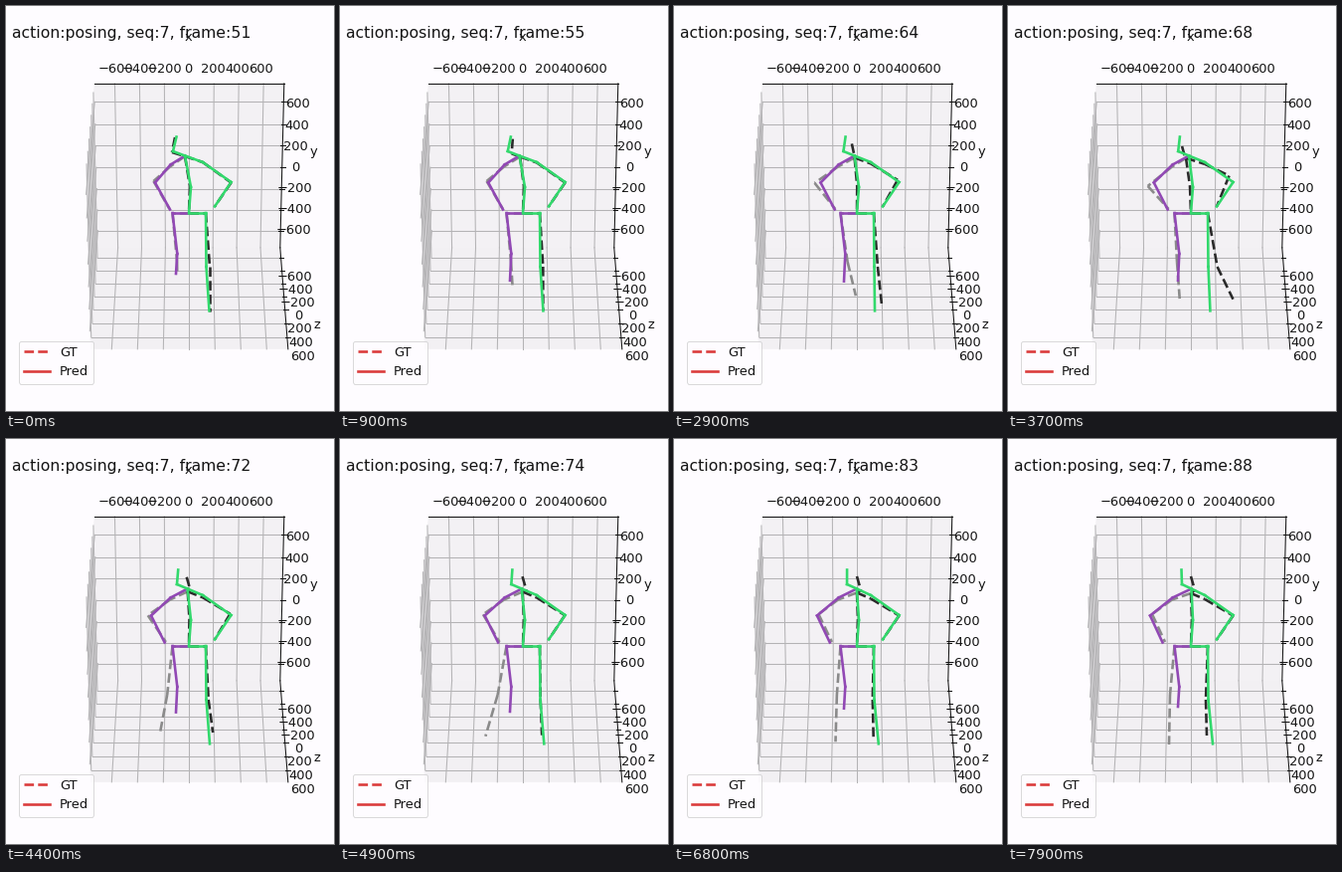
Animation, 330 px wide and 407 px high, one loop 8 s. Source, as a matplotlib script:

```python
import numpy as np
import matplotlib.pyplot as plt
from matplotlib.animation import FuncAnimation
from matplotlib.patches import Polygon

W, H, DPI = 330, 407, 64
PX = 72 / DPI  # points per pixel
FRAMES, INTERVAL = 80, 100
FIRST, LAST = 51, 88
LIMIT = 765.6
TICKS = np.arange(-600, 601, 200)
SMALL, LARGE = 13 * PX, 15.6 * PX
THIN, THICK = 1.04 * PX, 2.6 * PX
PAPER, INK, GRID = "#fefcff", "#141414", "#b4b3b5"
RED, GREEN, PURPLE = "#db3b3b", "#32d96c", "#9148b4"
BLACK, GRAY = "#2a2a2a", "#8a8a8a"

plt.rcParams["font.family"] = "DejaVu Sans"
plt.rcParams["text.color"] = INK
fig = plt.figure(figsize=(W / DPI, H / DPI), dpi=DPI, facecolor=PAPER)
ax = fig.add_axes([0, 0, 1, 1])
ax.set_xlim(0, W)
ax.set_ylim(H, 0)
ax.axis("off")


def project(x, y, z):
    """Perspective view of the cube [-1, 1]^3, in pixels."""
    w = 1 - 0.02231 * y - 0.04282 * z
    return 184.3 + 97.46 * x / w, (208.6 - 89.613 * y + 39.548 * z) / w


def line3d(p, q, color=INK, zorder=3):
    (x0, y0), (x1, y1) = project(*p), project(*q)
    ax.plot([x0, x1], [y0, y1], color=color, lw=THIN, zorder=zorder)


def pane(corners, shade):
    points = [project(*c) for c in corners]
    ax.add_patch(Polygon(points, fc=shade, ec="none", zorder=1))


def label(x, y, text, size=SMALL, ha="center"):
    return ax.text(x, y, text, fontsize=size, ha=ha, va="baseline", zorder=9)


def draw_box():
    pane([(-1, 1, -1), (-1, -1, -1), (-1, -1, 1), (-1, 1, 1)], "#f5f3f6")
    pane([(-1, 1, -1), (1, 1, -1), (1, -1, -1), (-1, -1, -1)], "#f3f1f4")
    pane([(-1, -1, -1), (1, -1, -1), (1, -1, 1), (-1, -1, 1)], "#f2f0f3")
    for t in TICKS / LIMIT:
        line3d((t, 1, -1), (t, -1, -1), GRID, 2)
        line3d((t, -1, -1), (t, -1, 1), GRID, 2)
        line3d((-1, t, -1), (1, t, -1), GRID, 2)
        line3d((-1, t, -1), (-1, t, 1), GRID, 2)
        line3d((-1, -1, t), (1, -1, t), GRID, 2)
        line3d((-1, 1, t), (-1, -1, t), GRID, 2)
        line3d((0.98, t, -1), (1.03, t, -1))
        line3d((0.98, -1, t), (1.03, -1, t))
    line3d((-1, 1, -1), (1, 1, -1))
    line3d((1, 1, -1), (1, -1, -1))
    line3d((1, -1, -1), (1, -1, 1))


def draw_labels():
    for t in TICKS:
        s, text = t / 600, str(t).replace("-", "\u2212")
        label(183.5 + 73.3 * s, 66.6, text)
        label(291.3 + 1.7 * s, 165.7 - 63.2 * s, text)
        label(294.5 + 4 * s, 314.8 + 40 * s + s * s, text)
    label(183.5, 34.8, "x")
    label(309, 149.8, "y")
    label(313, 323.5, "z")


def mix(a, b, t):
    return a + (b - a) * t


def bump(u, center, width):
    return np.exp(-((u - center) / width) ** 2)


def pred_pose(u):
    """Nearly still figure that drifts slowly over the loop."""
    return {
        "crown": (mix(171.5, 174.5, u), 131.5),
        "nose": (mix(168, 175, u), 146),
        "neck": (mix(180, 184.5, u), 150.5),
        "spine": (186, 182), "pelvis": (184, 208),
        "shoulder_r": (198, 157), "elbow_r": (226.5, 177),
        "hand_r": (210, 201.5),
        "hip_r": (201, 208), "knee_r": (201.5, 262),
        "foot_r": (mix(204.5, 206, u) - 3 * bump(u, 0.35, 0.15), 306.3),
        "shoulder_l": (165.5, 159.5),
        "elbow_l": (mix(150, 143, u), 177.5),
        "hand_l": (mix(165, 155.5, u), 204.5),
        "hip_l": (167.5, 208), "knee_l": (172.3, 249),
        "foot_l": (171, 269 + 8 * np.sin(np.pi * np.sqrt(u))),
    }


def true_pose(u):
    """Stepping figure: the right leg swings out, then the left one."""
    step = bump(u, 0.45, 0.1)
    turn = min(1, 2.5 * u)
    swing_r = 24 * step - 9 * bump(u, 0.27, 0.08)
    swing_l = 15 * bump(u, 0.32, 0.16) - 21 * bump(u, 0.65, 0.12)
    return pred_pose(0) | {
        "crown": (mix(170, 184, turn) - 9 * step, mix(132, 138, turn) + 3 * step),
        "nose": (mix(167, 188, turn) - 10 * step, mix(147, 152, turn)),
        "neck": (mix(180, 184, turn) - 5 * step, mix(151, 155, u)),
        "spine": (185 - 2 * step, 181),
        "shoulder_r": (198, mix(157, 161, u)),
        "elbow_r": (226.5 - 4 * step, 177.5 - 7 * step),
        "knee_r": (mix(205, 199, u) + 0.35 * swing_r, 262),
        "foot_r": (mix(205, 200, u) + swing_r,
                   mix(307, 298, u) - 9 * bump(u, 0.5, 0.13)),
        "shoulder_l": (165, 161.5),
        "elbow_l": (mix(148.5, 145, u) - 6.5 * bump(u, 0.42, 0.2),
                    176 + 5 * step),
        "hand_l": (mix(164.5, 158, u), 204),
        "knee_l": (mix(172, 163, u) + 0.4 * swing_l, 257),
        "foot_l": (mix(172, 162, u) + swing_l, mix(268, 307, np.sqrt(u))),
    }


LEFT = ["neck shoulder_l", "shoulder_l elbow_l", "elbow_l hand_l",
        "pelvis hip_l", "hip_l knee_l", "knee_l foot_l"]
RIGHT = ["crown nose", "nose neck", "neck spine", "spine pelvis",
         "neck shoulder_r", "shoulder_r elbow_r", "elbow_r hand_r",
         "pelvis hip_r", "hip_r knee_r", "knee_r foot_r"]


def make_bones(left, right, style, zorder):
    return [(ax.plot([], [], style, color=color, lw=THICK, zorder=zorder)[0],
             name.split())
            for names, color in ((LEFT, left), (RIGHT, right))
            for name in names]


def update(i):
    k = FIRST + int(i * 0.475 + 0.1)
    u = (k - FIRST) / (LAST - FIRST)
    title.set_text(f"action:posing, seq:7, frame:{k}")
    for bones, pose in ((true_bones, true_pose(u)), (pred_bones, pred_pose(u))):
        for line, ends in bones:
            line.set_data(*zip(*(pose[e] for e in ends)))


draw_box()
draw_labels()
title = label(6, 32, "", LARGE, "left")
true_bones = make_bones(GRAY, BLACK, "--", 5)
pred_bones = make_bones(PURPLE, GREEN, "-", 6)
handles = [plt.Line2D([], [], color=RED, lw=THICK, ls=s, label=t)
           for s, t in (("--", "GT"), ("-", "Pred"))]
legend = ax.legend(handles=handles, loc="lower left", fontsize=SMALL,
                   bbox_to_anchor=(12.5, 379.5), bbox_transform=ax.transData,
                   borderaxespad=0, facecolor=PAPER)
legend.set_zorder(10)

anim = FuncAnimation(fig, update, frames=FRAMES, interval=INTERVAL,
                     repeat=True, repeat_delay=0)
plt.show()
```
